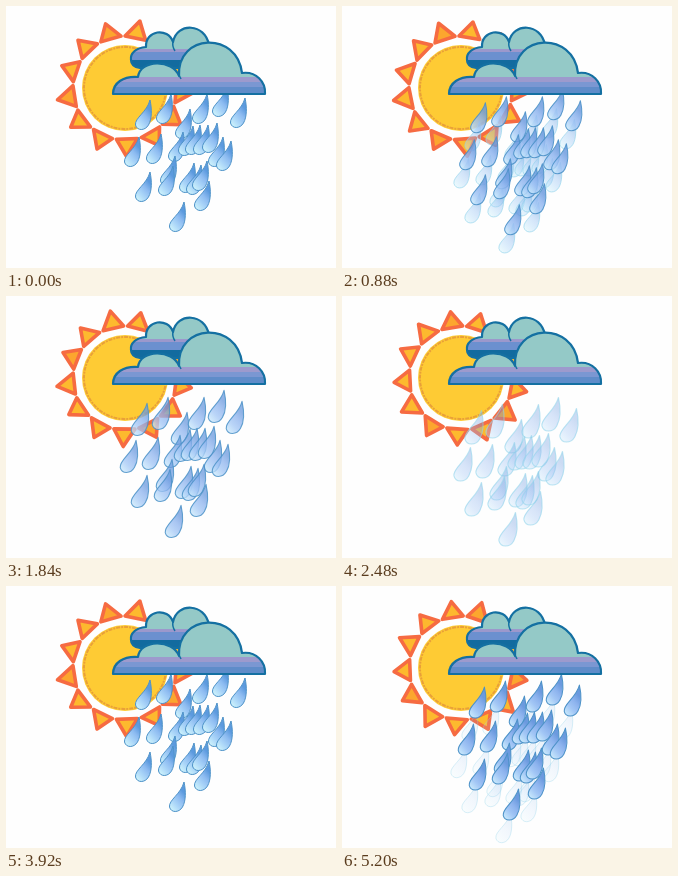
Recreate the animation shown at these times as an HTML page with a canvas. Size 330 by 262 pixels, loop 5280 ms.

```html
<!DOCTYPE html>
<html>
<head>
<meta charset="utf-8">
<style>
html, body { margin: 0; height: 100%; overflow: hidden; background: #fefefe; }
canvas { display: block; }
</style>
</head>
<body>
<canvas id="stage" width="330" height="262"></canvas>
<script>
const c = document.getElementById('stage').getContext('2d');
const STEP = 80, LOOP = 5280, CYCLE = 49, RAYS = 13;
const clamp = v => Math.max(0, Math.min(1, v));

const drops = [
  [137, 109], [158, 103], [177, 118], [194, 103], [214, 96], [232, 107],
  [126, 146], [148, 143], [170, 141], [180, 135], [187, 134], [195, 134],
  [204, 132], [210, 146], [218, 150], [162, 165], [160, 175], [137, 181],
  [181, 172], [188, 174], [194, 170], [196, 190], [171, 211]
];
const dropShape = new Path2D('M7-15C9-6 9 4 5.5 10C2 16-6 16-7.5 10C-8.5 3 4-3 7-15Z');

function gradient(...colors) {
  const g = c.createLinearGradient(-7, 10, 8, -3);
  colors.forEach((color, i) => g.addColorStop(i / (colors.length - 1), color));
  return g;
}
const clearWater = gradient('#c9effb', '#a9d4f8', '#8dbbf1', '#5c9ade');
const softWater = gradient('#c3e4fb', '#a2c6f5', '#8db3ee', '#6b9ade');

function paint(path, fill, stroke, width) {
  c.fillStyle = fill;
  c.fill(path);
  if (!stroke) return;
  c.strokeStyle = stroke;
  c.lineWidth = width;
  c.stroke(path);
}

function circle(r) {
  const p = new Path2D();
  p.arc(0, 0, r, 0, 7);
  return p;
}

function sun(n) {
  c.save();
  c.translate(119, 82);
  c.lineJoin = 'round';
  c.save();
  c.rotate((-16 + n * 360 / CYCLE) * Math.PI / 180);
  for (let i = 0; i < RAYS; i++) {
    const tip = 67 + (i % 3 === 1 ? 1.5 : 0);
    const lean = i % 2 ? 1 : -1;
    paint(new Path2D(`M-10.5-51L${lean}-${tip}L10.5-51Z`),
      i % 5 === 0 ? '#fca62e' : '#fdb92e', '#f66b42', 3.6);
    c.rotate(2 * Math.PI / RAYS);
  }
  c.restore();
  paint(circle(43), '#fecb34');
  c.setLineDash([4, 1, 2, 1]);
  c.strokeStyle = '#e9a038';
  c.lineWidth = 2;
  c.stroke(circle(41));
  c.restore();
}

// Outlines outlast the fill while a shower fades.
function rain(dx, dy, scale, alpha, water) {
  for (const [x, y] of drops) {
    c.save();
    c.translate(x + dx, y + dy);
    c.scale(scale, scale);
    c.globalAlpha = alpha;
    paint(dropShape, water);
    c.globalAlpha = Math.sqrt(alpha);
    c.strokeStyle = alpha < .5 ? '#8fd3ea' : '#4d92c8';
    c.stroke(dropShape);
    c.restore();
  }
}

const backCloud = new Path2D(
  'M125 54C124 47 130 42 140 41C139 24 162 21 167 36C171 16 199 17 203 39L203 62L134 62C128 61 125 58 125 54Z');
const frontCloud = new Path2D(
  'M107 88C107 77 117 70 132 71C134 53 167 53 173 70C171 27 231 25 236 67C250 65 260 76 259 88Z');
const backBumps = new Path2D('M167 36C166 40 167 42 169 45');
const frontBumps = new Path2D('M173 69L175 73');

function cloud(shape, bumps, bands) {
  c.save();
  paint(shape, '#94c9c7');
  c.clip(shape);
  for (const [y, h, color] of bands) {
    c.fillStyle = color;
    c.fillRect(100, y, 170, h);
  }
  c.restore();
  c.lineJoin = 'round';
  c.strokeStyle = '#1470a2';
  c.lineWidth = 2.2;
  c.stroke(shape);
  c.lineWidth = 1.5;
  c.stroke(bumps);
}

function draw(now) {
  const n = Math.floor(now % LOOP / STEP) % CYCLE;
  c.fillStyle = '#fefefe';
  c.fillRect(0, 0, 330, 262);
  c.lineWidth = 1;
  sun(n);

  // The first shower fades in before the cycle restarts, then falls away.
  c.lineWidth = 1;
  const fall = n > 41 ? 0 : n;
  rain(-.6 * fall, 1.95 * fall, 1,
    n > 41 ? (n - 42) / 7 : clamp(1 - n / 18), clearWater);

  // The second shower is slower and swells a little.
  const slow = Math.max(0, n - 8);
  rain(-.24 * slow, .98 * slow, 1 + .006 * slow,
    Math.min(clamp((n - 6) / 6), clamp((38 - n) / 20)), softWater);

  cloud(backCloud, backBumps, [
    [43, 3, '#9c98cc'], [46, 8, '#6c90cf'], [54, 9, '#126b9f']
  ]);
  cloud(frontCloud, frontBumps, [
    [71, 5, '#9d9acd'], [76, 5, '#7b97d2'], [81, 8, '#5f8cc9']
  ]);
}

const start = performance.now();
function tick() {
  draw(performance.now() - start);
  requestAnimationFrame(tick);
}
tick();
</script>
</body>
</html>
```
